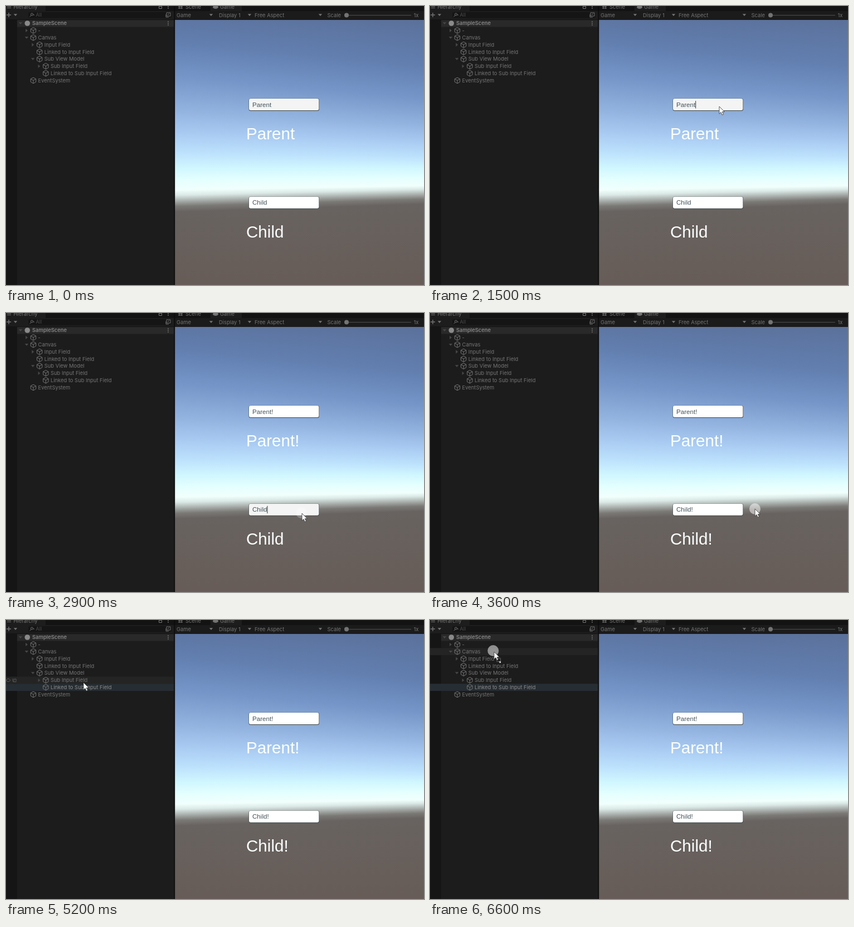
An HTML page with a canvas that plays this animation: 750x500 px, repeating every 8000 ms.

```html
<!DOCTYPE html>
<html lang="en">
<head>
<meta charset="utf-8">
<title>Editor with linked input fields</title>
<style>
  html, body { margin: 0; width: 100%; height: 100%; overflow: hidden; background: #1c1c1c; }
  canvas, svg { position: absolute; left: 0; top: 0; width: 750px; height: 500px; display: block; }
  text { white-space: pre; }
  .ui { font: 9.4px Inter, Roboto, sans-serif; fill: #747474; }
  .bold { font-weight: 600; fill: #858585; }
  .game { font-family: "Liberation Sans", Arial, sans-serif; }
  .small { font-size: 11.6px; fill: #44535a; }
  .big { font-size: 29.6px; fill: #fbffff; }
  .line { fill: none; stroke: #747474; }
  .mark { fill: #747474; }
  .arrow { fill: #484848; }
</style>
</head>
<body>
<canvas id="sky" width="750" height="500"></canvas>
<svg id="stage" viewBox="0 0 750 500"></svg>
<script>
const LOOP = 8000, STEP = 100;
const stage = document.getElementById('stage');

function add(tag, attrs, content) {
  const el = document.createElementNS('http://www.w3.org/2000/svg', tag);
  for (const k in attrs) el.setAttribute(k, attrs[k]);
  if (content !== undefined) el.textContent = content;
  stage.appendChild(el);
  return el;
}
const box = (x, y, width, height, fill, rx = 0) => add('rect', { x, y, width, height, fill, rx });
const label = (x, y, s, cls = 'ui') => add('text', { x, y, class: cls }, s);
const path = (d, cls, more = {}) => add('path', { d, class: cls, ...more });
const dropMark = (x, y, cls = 'mark') => path(`M${x - 3.2} ${y - 1.8}h6.4l-3.2 3.8z`, cls);
const foldMark = (x, y) => path(`M${x - 1.8} ${y - 3.2}v6.4l3.8-3.2z`, 'arrow');
const show = (el, on) => el.setAttribute('visibility', on ? 'visible' : 'hidden');
const at = (el, x, y) => el.setAttribute('transform', `translate(${x} ${y})`);

// Sky: each stop is [y at the left edge, y at the right edge, colour]
function paintSky() {
  const g = document.getElementById('sky').getContext('2d');
  const stops = [
    [0, 25, '#5b719b'], [65, 108, '#627fb0'], [125, 165, '#7595c8'], [180, 208, '#8fafdc'],
    [228, 244, '#a9cbf2'], [262, 270, '#bce1fc'], [290, 290, '#d0f6ff'], [312, 308, '#e4ffff'],
    [330, 322, '#f1fffc'], [339, 328, '#dceae7'], [350, 338, '#a5aba8'], [359, 346, '#7b7976'],
    [369, 355, '#686360'], [500, 500, '#675c57']
  ];
  for (let x = 303; x < 750; x++) {
    const k = (x - 303) / 447;
    const grad = g.createLinearGradient(0, 0, 0, 500);
    for (const [l, r, c] of stops) grad.addColorStop((l + (r - l) * k) / 500, c);
    g.fillStyle = grad;
    g.fillRect(x, 25, 1, 475);
  }
}

// Hierarchy: [name, depth, fold state]
const ROW_H = 12.8, ROW_TOP = 37.5;
const rows = [
  ['-', 0, 'shut'], ['Canvas', 0, 'open'], ['Input Field', 1, 'shut'], ['Linked to Input Field', 1],
  ['Sub View Model', 1, 'open'], ['Sub Input Field', 2, 'shut'],
  ['Linked to Sub Input Field', 2], ['EventSystem', 0]
];
const PICKED = 6;
const rowY = i => ROW_TOP + ROW_H * i;

function cube(x, y) {
  path(`M${x} ${y - 5.3}l4.7 2.5v5.4l-4.7 2.7l-4.7-2.7v-5.4zM${x - 4.7} ${y - 2.8}l4.7 2.6l4.7-2.6M${x} ${y - .2}v5.4`,
    'line', { 'stroke-linejoin': 'round' });
}
function kebab(x, y) {
  for (const d of [-3, 0, 3]) add('circle', { cx: x, cy: y + d, r: .9, class: 'mark' });
}

paintSky();

// Panel surfaces
box(0, 0, 302, 500, '#1c1c1c');
box(0, 25, 20, 475, '#151515');
box(0, 0, 302, 9, '#131313');
box(0, 0, 71, 9, '#1d1d1d');
box(0, 9, 302, 15.5, '#1d1d1d');
box(40, 11, 257, 10.5, '#151515', 3);
box(20, 25, 281, 12.5, '#292929');
box(0, 24.3, 302, .8, '#121212');
box(303, 0, 447, 9, '#131313');
box(367, 0, 56, 9, '#1d1d1d');
box(303, 9, 447, 16, '#1b1b1b');
box(301.5, 0, 1.7, 500, '#0c0c0c');

// Hierarchy header
path('M2 .7h7M2 3.4h7', 'line');
label(13.5, 5, 'Hierarchy');
path('M274.5 .5h5v4h-5z', 'line');
kebab(291, 1);
path('M5 12v8M1 16h8', 'line', { 'stroke-width': 1.4 });
dropMark(17, 16);
add('circle', { cx: 46.5, cy: 15, r: 2, class: 'line' });
path('M45 17l-2.5 2.3M49 16h2', 'line');
label(53.5, 19, 'All').setAttribute('style', 'fill:#4c4c4c;font-size:9px');
path('M288 12h7v6h-7zM287 15v5h5M290 16l3-2.5', 'line');

// Game header
path('M311 0v5M315 0v5M309 1h8M309 4h8', 'line');
label(322, 5, 'Scene');
add('ellipse', { cx: 376, cy: 2, rx: 5, ry: 3, class: 'mark' });
label(384, 5, 'Game');
label(306, 20, 'Game');
dropMark(368, 16);
label(382, 20, 'Display 1');
dropMark(437, 16);
label(446, 20, 'Free Aspect');
dropMark(564, 16);
label(576.5, 20, 'Scale');
box(612, 16, 115, 1.2, '#494949');
add('circle', { cx: 611, cy: 16.5, r: 4, fill: '#747474' });
label(731.5, 20, '1x');

// Scene row
dropMark(26, 31, 'arrow');
add('circle', { cx: 38.3, cy: 31, r: 4.8, fill: '#8a8a8a' });
label(47, 34.4, 'SampleScene', 'ui bold');
kebab(291, 31);

// Hover and selection bands lie under the row labels
const hoverBand = box(0, 0, 301, ROW_H, '#242424');
const pickBand = box(0, rowY(PICKED), 301, ROW_H, '#262d33');
const names = rows.map(([name, depth, fold], i) => {
  const x = 49 + depth * 11.2, y = rowY(i) + ROW_H / 2;
  if (fold === 'shut') foldMark(x - 12, y);
  if (fold === 'open') dropMark(x - 12, y, 'arrow');
  cube(x, y);
  return label(x + 8.6, y + 3.3, name);
});
const eye = path('M-1 0q4-5.5 8 0q-4 5.5-8 0M11-3v5M13-2h4v5h-4zM11 2l2 1', 'line', { opacity: .65 });
const dropLine = path('M57 63.3H299M57 63.3m-1.8 0a1.8 1.8 0 1 1-3.6 0a1.8 1.8 0 1 1 3.6 0', 'line',
  { style: 'stroke:#5d7286' });

// Input fields and their linked labels
function makeField(y, word) {
  box(435.5, y - .2, 126.6, 22.2, '#3f484b', 3.5);
  const face = box(436, y, 125.4, 21, '#fff', 3);
  const mark = box(442.5, y + 4, 10, 13.5, '#bcd8fb');
  const text = label(442, y + 14.6, word, 'game small');
  const caret = box(0, y + 4, 1, 13.5, '#323232');
  const big = label(431, y + 73, word, 'game big');
  return { word, face, mark, text, caret, big };
}
const parent = makeField(166, 'Parent');
const child = makeField(341.7, 'Child');

function setField(f, typed, colour, selected, focused) {
  const s = f.word + (typed ? '!' : '');
  if (f.text.textContent !== s) f.text.textContent = f.big.textContent = s;
  f.face.setAttribute('fill', colour);
  const w = f.text.getComputedTextLength();
  f.mark.setAttribute('width', w);
  f.caret.setAttribute('x', 442 + w);
  show(f.mark, selected);
  show(f.caret, focused);
}

// Pointer
const spot = add('circle', { r: 10, fill: '#fff' });
const arrow = path('M0 0V13.2L3 10.4L5.2 15.2L7.5 14.1L5.3 9.6H9.4Z', '', { fill: '#fff', stroke: '#333', 'stroke-width': .8 });
const dragMark = path('M4.5 12h4v4h-4zM9 15.500h3.500v4h-3.500z', '', { fill: '#fff', stroke: '#222' });
dragMark.setAttribute('d', 'M9 16.5h3.6v3.6h-3.6z');
const dragDash = path('M5 11.500h6.500v6h-6.500z', 'line', { 'stroke-dasharray': '1.5 1.5', style: 'stroke:#aaa' });

const route = [
  [100, 496, 425], [400, 495, 175], [1100, 495, 175], [1200, 519, 179], [1300, 515, 179],
  [1400, 515, 179], [1500, 519, 180], [1800, 519, 180], [2200, 503, 351], [2500, 505, 350],
  [2900, 531, 359], [3000, 548, 365], [3200, 548, 365], [3600, 583, 351], [3700, 583, 351],
  [3900, 391, 175], [4000, 391, 175], [4400, 200, 143], [4700, 146, 118], [4900, 146, 118],
  [5200, 139, 112], [5700, 120, 121], [6200, 115, 65], [6300, 115, 65], [6600, 115, 57]
];
// Clicks: [start, end of fade, x, y]
const clicks = [
  [600, 900, 495, 175], [1200, 1400, 519, 180], [2400, 2600, 505, 350],
  [2800, 3000, 530, 358], [3600, 4100, 583, 351], [4900, 5100, 146, 118]
];
const DRAG = 5700;

function pointer(t) {
  let i = route.findIndex(p => p[0] >= t);
  if (i < 0) return route[route.length - 1].slice(1);
  if (i === 0) return route[0].slice(1);
  const [t0, x0, y0] = route[i - 1], [t1, x1, y1] = route[i];
  const k = (t - t0) / (t1 - t0);
  return [x0 + (x1 - x0) * k, y0 + (y1 - y0) * k];
}
// Value of the last step that has begun
const stepAt = (t, steps) => steps.filter(s => s[0] <= t).pop()[1];
const within = (t, a, b) => t >= a && t < b;

function draw(ms) {
  const t = Math.floor(ms / STEP) * STEP;
  const [x, y] = pointer(t);
  const dragging = t >= DRAG + STEP;

  show(arrow, t >= 100);
  at(arrow, x, y);
  for (const el of [dragMark, dragDash]) { show(el, dragging); at(el, x, y); }

  const click = clicks.find(c => within(t, c[0], c[1]));
  show(spot, click || t >= DRAG);
  if (click) {
    at(spot, click[2], click[3]);
    spot.setAttribute('opacity', .5 * (1 - (t - click[0]) / (click[1] - click[0])));
  } else {
    at(spot, x - 1.7, y - 2);
    spot.setAttribute('opacity', .5);
  }

  setField(parent, t >= 1700,
    stepAt(t, [[0, '#f4f4f4'], [600, '#d2d2d2'], [700, '#c8c8c8'], [800, '#f4f4f4'], [2400, '#fff']]),
    within(t, 700, 1200), within(t, 1200, 2400));
  setField(child, t >= 3200,
    stepAt(t, [[0, '#fff'], [2200, '#f4f4f4'], [2400, '#d2d2d2'], [2500, '#f4f4f4'], [3600, '#fff']]),
    within(t, 2400, 2800), within(t, 2800, 3600));

  const row = Math.floor((y - ROW_TOP) / ROW_H);
  const over = t >= 4100 && x < 301 && row >= 0 && row < rows.length;
  show(hoverBand, over);
  if (over) hoverBand.setAttribute('y', rowY(row));
  show(eye, over && !dragging);
  if (over) at(eye, 1, rowY(row) + ROW_H / 2);
  const picked = t >= 4900;
  show(pickBand, picked);
  names[PICKED].style.fill = picked ? '#8c8c8c' : '';
  show(dropLine, within(t, 6200, 6400));
}

const start = performance.now();
function frame() {
  draw((performance.now() - start) % LOOP);
  requestAnimationFrame(frame);
}
frame();
</script>
</body>
</html>
```
